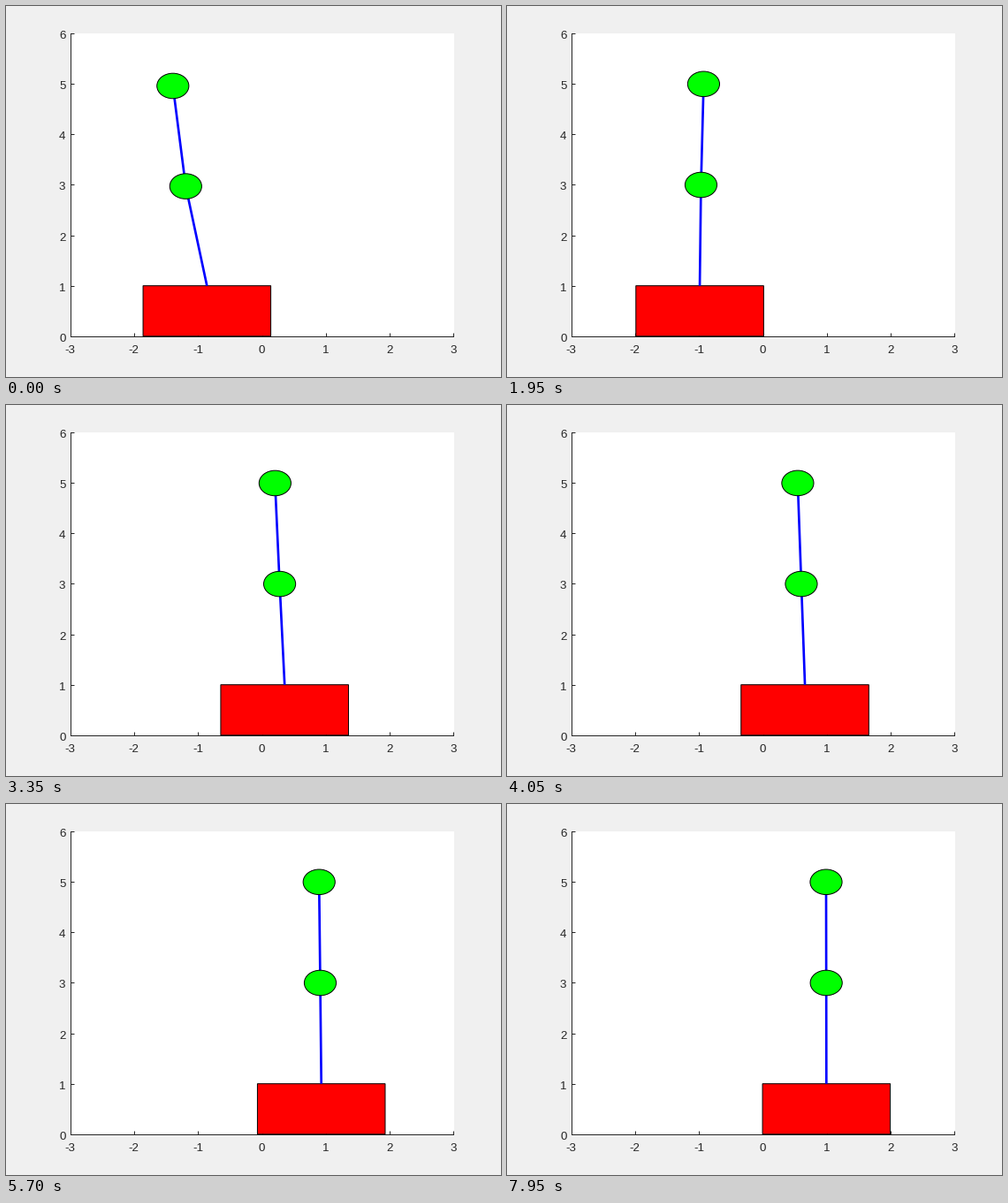
A matplotlib script that plays this animation: 560x420 px, repeating every 8000 ms.

```python
import matplotlib.pyplot as plt
import numpy as np
from matplotlib.animation import FuncAnimation
from matplotlib.patches import Ellipse, Polygon, Rectangle
from numpy.polynomial import Polynomial

W, H, DPI = 560, 420, 70
PX = 72 / DPI                      # points per pixel
FRAMES, STEP = 160, 50
BACK, INK, ICON = "#f0f0f0", "#262626", "#686868"
X0, SX = 72.8, 72.27               # plot coordinates to pixels
Y0, SY = 373.8, 57.1


def px(x):
    return X0 + SX * (x + 3)


def py(y):
    return Y0 - SY * y


# Balanced double pendulum, equal masses, small angles: the upper ball sets
# the motion, the lower ball and the cart follow from its derivatives.
L, G, GOAL = 2.0, 9.81, 1.0
K = L / G
TOP = Polynomial([1])
MID = Polynomial([1, 0, -K])
CART = Polynomial([1, 0, -2 * K, 0, K * K / 2])
SWAY, WHIP = np.sqrt((2 - 2 ** 0.5) / K), np.sqrt((2 + 2 ** 0.5) / K)
# distance to the goal: sum of (a + b t) exp(-s t)
DECAY = [(1.13, -11.08, 13.58), (3.0, 6.165, 13.585),
         (SWAY, 3.645, 0), (WHIP, 3.665, 0)]


def place(op, t):
    return GOAL - sum((op(-s) * (a + b * t) + op.deriv()(-s) * b)
                      * np.exp(-s * t) for s, a, b in DECAY)


fig = plt.figure(figsize=(W / DPI, H / DPI), dpi=DPI, facecolor=BACK)
ax = fig.add_axes([0, 0, 1, 1])
ax.set_xlim(0, W)
ax.set_ylim(H, 0)
ax.axis("off")


def stroke(pts, color=INK, width=1.0, z=1, cap="butt"):
    xs, ys = zip(*pts)
    return ax.plot(xs, ys, color=color, lw=width * PX, zorder=z, snap=False,
                   solid_capstyle=cap)[0]


def add(patch, width=1.0, z=3, edge="black"):
    patch.set(edgecolor=edge, linewidth=width * PX, zorder=z, snap=False)
    return ax.add_patch(patch)


def label(x, y, text, ha):
    ax.text(x, y, text, ha=ha, va="baseline", color=INK,
            fontsize=13.33 * PX, family="Liberation Sans")


def crisp(v):
    return round(v) + 0.5


plot_box = add(Rectangle((73, 31), 434, 344, fc="white"), 0, 0)
left, base = crisp(X0), crisp(Y0)
stroke([(left, 31), (left, base + 0.5)])
stroke([(left - 0.5, base), (507, base)])
for v in range(7):
    x, y = px(v - 3), py(v)
    stroke([(left, crisp(y)), (left + 4, crisp(y))])
    stroke([(crisp(x), base), (crisp(x), base - 4)])
    label(67.5, y + 6, str(v), "right")
    label(x - 0.3, 393, str(v - 3), "center")

cart = add(Rectangle((0, py(1)), 2 * SX, SY, fc="#ff0000"))
cart.set_clip_path(plot_box)
rod = stroke([(0, 0), (0, 0)], "#0000ff", 2.67, 4)
balls = [add(Ellipse((0, 0), SX / 2, SY / 2, fc="#00ff00"), z=5)
         for _ in range(2)]


def toolbar():
    parts = []

    def line(*pts, color=ICON, width=1.15, z=6, cap="butt"):
        parts.append(stroke(pts, color, width, z, cap))

    def shape(*pts, fill="none"):
        parts.append(add(Polygon(pts, fc=fill), 1.1, 6, ICON))

    # export
    line((390, 24), (393, 18), (398, 18))
    shape((398, 13.5), (403, 18), (398, 22.5))
    line((389.5, 22), (389.5, 26.5), (401, 26.5))
    shape((402, 25), (405, 25), (403.5, 26.5), fill=ICON)
    # data tip
    shape((412, 12.5), (425, 12.5), (425, 27.5), (412, 27.5))
    for y in (17.5, 22.5):
        line((415, y), (422.5, y))
    line((410, 20), (412, 20))
    # hand: outlined fingers spread from one palm
    for color, width, z in ((ICON, 3.6, 6), (BACK, 1.5, 7)):
        for angle in np.radians((-50, -18, 0, 18, 40)):
            reach = 10 * np.cos(angle) ** 0.5
            line((438, 23.5), (438 + reach * np.sin(angle),
                               23.5 - reach * np.cos(angle)),
                 color=color, width=width, z=z, cap="round")
        line((437, 24), (439, 24), color=color, width=width + 4, z=z,
             cap="round")
    # zoom in, zoom out
    for x in (455.3, 475.3):
        parts.append(add(Ellipse((x, 18.2), 12, 12, fc="none"), 1.15, 6, ICON))
        line((x - 3, 18.2), (x + 3, 18.2))
        line((x + 4.3, 22.5), (x + 10, 28))
    line((455.3, 15.2), (455.3, 21.2))
    # home
    line((489, 20.5), (497, 12.8), (505, 20.5))
    for side in (-1, 1):
        line(*((497 + side * dx, y) for dx, y in
               ((5.5, 18.5), (5.5, 27.5), (1.8, 27.5), (1.8, 21.5), (0, 21.5))))
    return parts


icons = toolbar()


def draw(i):
    t = i * STEP / 1000
    xs = [place(op, t) for op in (CART, MID, TOP)]
    ys = [1]
    for a, b in zip(xs, xs[1:]):
        ys.append(ys[-1] + np.sqrt(L * L - (b - a) ** 2))
    pts = [(px(x), py(y)) for x, y in zip(xs, ys)]
    cart.set_x(px(xs[0] - 1))
    rod.set_data(*zip(*pts))
    for ball, centre in zip(balls, pts[1:]):
        ball.set_center(centre)
    for part in icons:
        part.set_visible(4.5 <= t < 5.0)
    return [cart, rod, *balls, *icons]


anim = FuncAnimation(fig, draw, frames=FRAMES, interval=STEP,
                     init_func=lambda: draw(0), repeat=True, repeat_delay=0)
plt.show()
```
